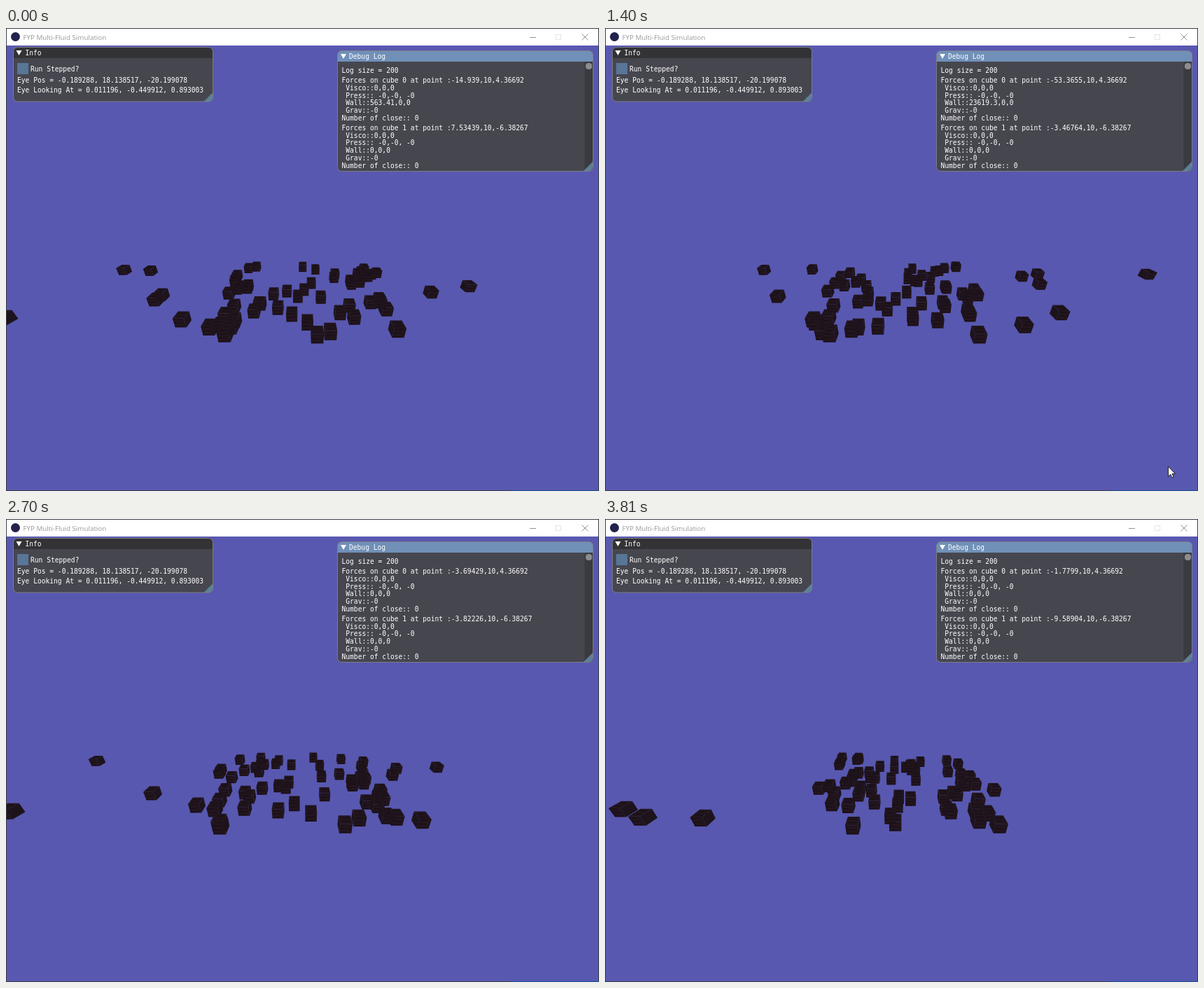
An HTML page with a canvas for the animation above (3870 ms loop, 847 px wide and 661 px high).

```html
<!DOCTYPE html>
<html lang="en">
<head>
<meta charset="utf-8">
<title>Multi-Fluid Simulation</title>
<style>
  html, body { margin: 0; width: 100%; height: 100%; overflow: hidden; background: #5858b0; }
  canvas, svg { position: absolute; left: 0; top: 0; width: 847px; height: 661px; }
  .mono text { font: 9.62px "DejaVu Sans Mono", monospace; fill: #fff; white-space: pre; }
  .caption { font: 9.8px "Open Sans", sans-serif; fill: #999; }
</style>
</head>
<body>
<canvas id="scene" width="847" height="661"></canvas>
<svg viewBox="0 0 847 661">
  <rect width="847" height="25" fill="#fff"/>
  <circle cx="13.5" cy="12.5" r="6.5" fill="#22224e"/>
  <text class="caption" x="24.5" y="16.5">FYP Multi-Fluid Simulation</text>
  <g fill="none" stroke="#929292">
    <path d="M748 13.5h9M822.5 8.5l9 9M831.5 8.5l-9 9"/>
    <rect x="785.5" y="9.5" width="7" height="7" stroke="#e4e4e4"/>
  </g>
  <rect x=".5" y=".5" width="846" height="660" fill="none" stroke="#3c3c48"/>
  <path d="M720 660.5h127" stroke="#1c4f8c"/>

  <g class="mono">
    <rect x="10.5" y="27.5" width="285" height="77.5" rx="6" fill="#46464f"/>
    <path d="M10.5 43V33.5a6 6 0 0 1 6-6h273a6 6 0 0 1 6 6V43z" fill="#333336"/>
    <path d="M295.500 92v7a6 6 0 0 1-6 6h-7z" fill="#5d8196"/>
    <rect x="10.5" y="27.5" width="285" height="77.5" rx="6" fill="none" stroke="#7d7d84"/>
    <path d="M14.5 32h8l-4 7z" fill="#fff"/>
    <rect x="16" y="50" width="16" height="16" fill="#587698"/>
    <text x="27.5" y="39">Info</text>
    <text x="35" y="61.5">Run Stepped?</text>
    <text x="16" y="78">Eye Pos = -0.189288, 18.138517, -20.199078</text>
    <text x="16" y="92">Eye Looking At = 0.011196, -0.449912, 0.893003</text>

    <rect x="473.5" y="32.5" width="365" height="172" rx="6" fill="#46464f"/>
    <path d="M826.5 48h12v150a6 6 0 0 1-6 6h-6z" fill="#3a3a41"/>
    <rect x="828" y="50" width="9" height="9" rx="4" fill="#8d8d8d"/>
    <path d="M473.5 48V38.5a6 6 0 0 1 6-6h353a6 6 0 0 1 6 6V48z" fill="#7090b8"/>
    <path d="M838 191v7a6 6 0 0 1-6 6h-7z" fill="#5d8196"/>
    <rect x="473.5" y="32.5" width="365" height="172" rx="6" fill="none" stroke="#7d7d84"/>
    <path d="M478 37h8l-4 7z" fill="#fff"/>
    <text x="490" y="44">Debug Log</text>
    <text x="479.5" y="64">Log size = 200</text>
    <g id="log"></g>
  </g>
  <path id="cursor" d="M0 0V14.2L3.3 11.2L5.5 16L7.6 15.1L5.5 10.4H10z" fill="#fff" stroke="#111" stroke-width=".9"/>
</svg>
<script>
const LOOP = 3870, WALL = 14, COUNT = 60, HALF = 0.87, TAU = 2 * Math.PI;
const ctx = document.getElementById('scene').getContext('2d');
const cursor = document.getElementById('cursor');

// The simulation advances in bursts of nine 60 ms steps with a short rest between.
const bursts = [50, 600, 1150, 1720, 2270, 2830, 3380];
function stepAt(t) {
  const b = bursts.filter(start => start <= t).length - 1;
  return b < 0 ? 0 : 9 * b + 1 + Math.min(8, Math.floor((t - bursts[b]) / 60));
}

let seed = 90210;
const rnd = () => (seed = (seed * 16807) % 2147483647) / 2147483647;
const clamp = x => Math.max(-WALL, Math.min(WALL, x));

// Pitched camera; x points right on screen, y up, z away.
function project(x, y, z) {
  const k = 317 / (44.3 + 0.893 * z - 0.45 * y);
  return [423.5 + x * k, 343 + (3.23 - 0.45 * z - 0.893 * y) * k];
}

// Every cube keeps its row, sways between the walls and is now and then thrown past one.
const cubes = Array.from({ length: COUNT }, (_, i) => ({
  z: -14.2 + 22.5 * (i + rnd()) / COUNT,
  phase: rnd(),
  period: (60 + 60 * rnd()) * (rnd() < 0.5 ? -1 : 1),
  cycle: 20 + 20 * rnd(),
  offset: rnd(),
  peak: (18 + 40 * rnd() ** 1.5) * (rnd() < 0.5 ? -1 : 1)
}));
function cubeX({ phase, period, cycle, offset, peak }, n) {
  const x = WALL * Math.sin(TAU * (phase + n / period));
  const flight = ((n / cycle + offset) % 1) / 0.22;
  return flight < 1 ? x + (peak - x) * Math.sin(Math.PI * flight) : x;
}

// The two cubes reported in the log, in world x (mirrored on screen).
const steps = [0, 5, 15, 30, 38, 49, 62];
const logged = [
  { z: 4.36692, xs: [-14.939017, -11.0506, -4.84425, -95.82164, -11.7496, 3.01847, -1.7799],
    touch: { 49: ['-1544.78,0,3.66587e-09', '-1.03293e-22,-0, 3.72325e-24', 1] } },
  { z: -6.38267, xs: [7.53439, -19.12017, -8.62491, 1.04497, 2.85255, -9.38461, -9.58904],
    touch: { 30: ['-79.3325,0,5.12056e-09', '9.08606e-21,-0, -1.10671e-21', 1],
      49: ['287.971,0,-9.03987e-11', '6.513e-19,-0, 1.34055e-18', 2] } }
];
function loggedX({ xs }, n) {
  const i = Math.max(0, steps.findIndex(s => s >= n) - 1);
  const p = (n - steps[i]) / (steps[i + 1] - steps[i]);
  return xs[i] + (xs[i + 1] - xs[i]) * p;
}

const general = v => String(Number(v.toPrecision(6)));
const lines = Array.from({ length: 12 }, (_, i) => {
  const text = document.createElementNS('http://www.w3.org/2000/svg', 'text');
  text.setAttribute('x', 479.5);
  text.setAttribute('y', 78 + 10.75 * i + (i > 5 ? 3.3 : 0));
  return document.getElementById('log').appendChild(text);
});
function writeLog(n) {
  logged.flatMap((cube, i) => {
    const x = loggedX(cube, n);
    const [visco, press, close] = cube.touch[n] || ['0,0,0', '-0,-0, -0', 0];
    return [
      `Forces on cube ${i} at point :${general(x)},10,${cube.z}`,
      ` Visco::${visco}`, ` Press:: ${press}`,
      ` Wall::${general(600 * (clamp(x) - x))},0,0`,
      ' Grav::-0', `Number of close:: ${close}`
    ];
  }).forEach((s, i) => { lines[i].textContent = s; });
}

function face(points, color) {
  ctx.beginPath();
  points.forEach(p => ctx.lineTo(...project(...p)));
  ctx.closePath();
  ctx.fillStyle = color;
  ctx.fill();
}
function grain(a, b, color) {
  ctx.beginPath();
  ctx.moveTo(...project(...a));
  ctx.lineTo(...project(...b));
  ctx.strokeStyle = color;
  ctx.lineWidth = 0.8;
  ctx.stroke();
}
function drawCube({ x, z }) {
  const h = HALF, l = x - h, r = x + h, near = z - h, far = z + h, side = x > 0 ? l : r;
  face([[side, -h, near], [side, h, near], [side, h, far], [side, -h, far]], '#1d131b');
  face([[l, h, near], [r, h, near], [r, h, far], [l, h, far]], '#21151d');
  face([[l, -h, near], [r, -h, near], [r, h, near], [l, h, near]], '#20141c');
  for (let i = 0; i < 5; i++) {
    const v = h * (0.4 * i - 0.8), cut = (i * 0.37) % 0.7;
    const color = i % 2 ? '#2b1a25' : '#150d15';
    grain([l + cut, v, near], [r - 0.6 + cut / 2, v, near], color);
    if (i % 2) grain([l + cut, h, z + v], [r - 0.3, h, z + v], '#150d15');
  }
}

// The pointer slides in from below, rests, and slides out again.
function moveCursor(n) {
  const away = Math.max(0, 4 - n, n - 22);
  cursor.setAttribute('visibility', away <= 2 ? 'visible' : 'hidden');
  cursor.setAttribute('transform', `translate(${800.5 + 4 * away} ${609 + 17 * away})`);
}

function draw(n) {
  ctx.fillStyle = '#5858b0';
  ctx.fillRect(0, 0, 847, 661);
  [
    ...cubes.map(c => ({ x: cubeX(c, n), z: c.z })),
    ...logged.map(c => ({ x: -loggedX(c, n), z: c.z }))
  ].sort((a, b) => b.z - a.z).forEach(drawCube);
  writeLog(n);
  moveCursor(n);
}

let last = -1;
function frame() {
  const n = stepAt(performance.now() % LOOP);
  if (n !== last) draw(last = n);
  requestAnimationFrame(frame);
}
frame();
</script>
</body>
</html>
```
